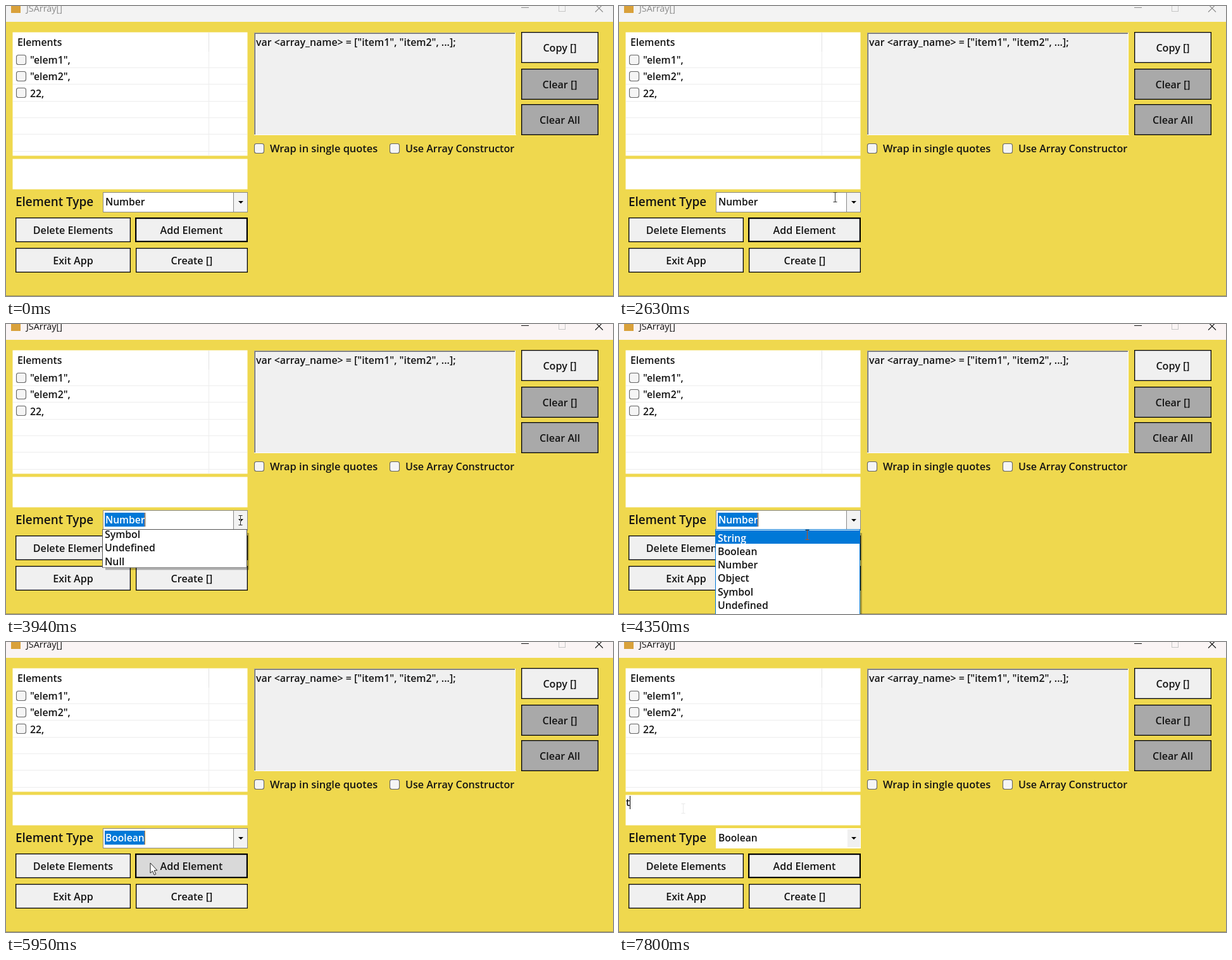
An HTML page with a canvas for the animation above (8000 ms loop, 959x458 px).

```html
<!DOCTYPE html>
<html lang="en">
<head>
<meta charset="utf-8">
<title>JSArray[]</title>
<style>
html, body { margin: 0; width: 100%; height: 100%; overflow: hidden; background: #efd84e; }
canvas { display: block; }
</style>
</head>
<body>
<canvas id="stage" width="959" height="458"></canvas>
<script>
const ctx = document.getElementById('stage').getContext('2d');
const LOOP = 8000;
const INK = '#141414', YELLOW = '#efd84e', FACE = '#f0f0f0', BLUE = '#0078d7';
const FAMILY = '"Open Sans", "Noto Sans", sans-serif';
const TYPES = ['String', 'Boolean', 'Number', 'Object', 'Symbol', 'Undefined', 'Null'];
const ROW = 21.3, LIST_H = TYPES.length * ROW + 2, LIST_W = 229;

// Event times in ms
const FOCUS = 3740, OPENED = 4010, PRESS = 5880, PICK = 5950, LEAVE = 6680, EDIT = 7280, TYPE = 7800;

// Pointer moves: start, end, steps, from, to, eased
const MOVES = [
  [740, 1070, 6, 840, 452, 681, 410],
  [1140, 1490, 6, 655, 400, 513, 345],
  [1560, 1620, 2, 500, 341, 491, 338],
  [2220, 2630, 7, 476, 334, 341, 302, true],
  [2760, 2960, 4, 342, 302, 344, 303],
  [3130, 3470, 6, 350, 304, 370, 310],
  [4200, 4350, 3, 346, 318, 297, 333],
  [4420, 4610, 4, 284, 335, 262, 338],
  [5080, 5420, 6, 258, 340, 238, 353],
  [5620, 5680, 2, 233, 351, 228, 349],
  [6680, 7010, 5, 205, 333, 101, 263, true]
];

function rect(x, y, w, h, color) {
  ctx.fillStyle = color;
  ctx.fillRect(x, y, w, h);
}

function frame(x, y, w, h, color, line = 1) {
  ctx.strokeStyle = color;
  ctx.lineWidth = line;
  ctx.strokeRect(x + line / 2, y + line / 2, w - line, h - line);
}

function text(str, x, y, size = 15.8, color = INK, align = 'left', weight = 600) {
  ctx.font = `${weight} ${size}px ${FAMILY}`;
  ctx.textAlign = align;
  ctx.fillStyle = color;
  ctx.fillText(str, x, y);
}

function poly(points, fill, stroke) {
  ctx.beginPath();
  points.forEach(([x, y]) => ctx.lineTo(x, y));
  ctx.closePath();
  ctx.fillStyle = fill;
  ctx.fill();
  if (stroke) {
    ctx.strokeStyle = stroke;
    ctx.lineWidth = 1;
    ctx.stroke();
  }
}

function lines(color, width, ...segments) {
  ctx.strokeStyle = color;
  ctx.lineWidth = width;
  ctx.beginPath();
  for (const [x1, y1, x2, y2] of segments) {
    ctx.moveTo(x1, y1);
    ctx.lineTo(x2, y2);
  }
  ctx.stroke();
}

function button(label, x, y, w, h, fill = FACE, line = 1.3) {
  rect(x, y, w, h, fill);
  frame(x, y, w, h, '#000', line);
  text(label, x + w / 2, y + h / 2 + 6.3, 16.1, INK, 'center');
}

function checkbox(x, y) {
  ctx.beginPath();
  ctx.roundRect(x + 0.5, y + 0.5, 15, 15, 3);
  ctx.fillStyle = '#f5f5f5';
  ctx.fill();
  ctx.strokeStyle = '#666';
  ctx.lineWidth = 1.1;
  ctx.stroke();
}

function pointer(t) {
  const move = MOVES.filter(m => t >= m[0]).pop();
  if (!move) return null;
  const [t0, t1, n, x0, y0, x1, y1, eased] = move;
  const step = Math.min(n - 1, Math.floor((t - t0) / (t1 - t0) * (n - 1) + 0.02));
  const u = step / (n - 1);
  const k = eased ? 1 - (1 - u) ** 1.5 : u;
  return { x: x0 + (x1 - x0) * k, y: y0 + (y1 - y0) * k };
}

function titleBar(active) {
  rect(0, 0, 959, 25, active ? '#faf4f4' : '#f3f3f3');
  rect(8, -4, 15, 15, '#d9a13a');
  const ink = active ? '#111' : '#8c8c8c';
  text('JSArray[]', 32, 8.5, 14.4, ink, 'left', 400);
  lines(ink, 1.1, [814, 2.5, 826, 2.5], [931, -2.5, 943, 9.5], [943, -2.5, 931, 9.5]);
  frame(873, -2, 11, 11, '#c6c6c6');
}

function elementList() {
  rect(10.5, 41.5, 371, 195, '#fff');
  for (let i = 0; i < 6; i++) rect(11, 97 + Math.round(i * 26.3), 370, 1, '#ededed');
  rect(320, 42, 1, 194, '#ededed');
  rect(320, 42, 1, 30, '#e0e0e0');
  text('Elements', 18, 63);
  ['"elem1",', '"elem2",', '22,'].forEach((item, i) => {
    checkbox(16, 77 + 26 * i);
    text(item, 38, 91 + Math.round(26.4 * i));
  });
}

function output() {
  rect(392, 42, 413, 162, FACE);
  rect(392, 42, 413, 1, '#a0a0a0');
  rect(392, 42, 1, 162, '#a0a0a0');
  rect(393, 43, 411, 1, '#696969');
  rect(393, 43, 1, 160, '#696969');
  rect(392, 203, 414, 1, '#fff');
  rect(804, 42, 1, 162, '#fff');
  text('var <array_name> = ["item1", "item2", ...];', 395, 63, 15.9);
}

function combo(t) {
  const value = t < PICK ? 'Number' : 'Boolean';
  const focused = t >= FOCUS && t < EDIT;
  rect(153, 294, 229, 32, '#fff');
  if (t < EDIT) {
    rect(360, 295, 21, 30, '#f3f3f3');
    frame(153, 294, 229, 32, '#8a8a8a');
    rect(359, 295, 1, 30, '#8a8a8a');
  } else {
    rect(361, 296, 20, 28, FACE);
  }
  poly([[367, 308], [375, 308], [371, 312]], '#000');
  ctx.font = `600 15.6px ${FAMILY}`;
  const end = 157 + ctx.measureText(value).width;
  if (focused) rect(156, 298, end - 155, 22, BLUE);
  text(value, 157, 315, 15.6, focused ? '#fff' : INK);
  const blink = Math.floor((t - PICK) / 530) % 2 === 0;
  if (focused && blink) rect(Math.round(end), 298, 1, 22, '#ff8728');
}

function dropDown(t, hover) {
  const step = Math.min(4, Math.floor((t - FOCUS) / (OPENED - FOCUS) * 4 + 0.02));
  if (step < 1) return;
  const shown = 15 + (LIST_H - 15) * (step - 1) / 3;
  rect(157, 330, 227, shown - 2, 'rgba(0,0,0,.28)');
  ctx.save();
  ctx.beginPath();
  ctx.rect(152, 324, LIST_W, shown + 1);
  ctx.clip();
  rect(152, 324, LIST_W, shown + 1, '#fff');
  const top = 326 - (LIST_H - shown);
  TYPES.forEach((name, i) => {
    const y = top + i * ROW, on = i === hover;
    if (on) rect(153, Math.round(y), LIST_W - 2, 21, BLUE);
    text(name, 156, y + 17.5, 15.8, on ? '#fff' : INK);
  });
  frame(152, 324, LIST_W, shown + 1, step < 4 ? '#555' : BLUE);
  ctx.restore();
}

function arrow(x, y) {
  const shape = [[0, 0], [0, 16], [3.6, 12.8], [6.2, 18.8], [8.8, 17.6], [6.2, 11.8], [10.8, 11.6]];
  poly(shape.map(([dx, dy]) => [x + dx, y + dy]), '#fff', '#222');
}

function iBeam(x, y, faint) {
  x = Math.round(x) + 0.5;
  y = Math.round(y);
  ctx.globalCompositeOperation = 'difference';
  lines(faint ? '#161616' : '#c8c8c8', 1,
    [x, y - 7, x, y + 7],
    [x - 3, y - 7.5, x + 3, y - 7.5],
    [x - 3, y + 7.5, x + 3, y + 7.5]);
  ctx.globalCompositeOperation = 'source-over';
}

function clickRing(x, y) {
  ctx.globalCompositeOperation = 'multiply';
  ctx.beginPath();
  ctx.arc(x - 1.5, y - 1, 15, 0, Math.PI * 2);
  ctx.fillStyle = '#ffff78';
  ctx.fill();
  ctx.globalCompositeOperation = 'source-over';
}

function draw(t) {
  const p = pointer(t);
  const open = t >= FOCUS && t < PICK;
  rect(0, 0, 959, 458, YELLOW);
  rect(0, 457, 959, 1, '#a99b48');
  titleBar(t >= FOCUS);
  elementList();
  output();

  button('Copy []', 814, 41, 122, 49);
  button('Clear []', 814, 99, 122, 49, '#a9a9a9');
  button('Clear All', 814, 155, 122, 49, '#a9a9a9');
  checkbox(392, 217);
  text('Wrap in single quotes', 417, 231, 16.4);
  checkbox(606, 217);
  text('Use Array Constructor', 631, 231, 16.1);

  rect(10.5, 241.5, 371, 48, '#fff');
  if (t >= TYPE) text('t', 11, 259);
  if (t >= EDIT) rect(t < TYPE ? 12 : 17, 243, 1, 21, '#000');

  text('Element Type', 15, 315.5, 18.9);
  combo(t);
  button('Delete Elements', 15, 334, 182, 39);
  button('Add Element', 204, 334, 178, 39, t >= PICK && t < LEAVE ? '#d9d9d9' : FACE, 2.2);
  button('Exit App', 15, 382, 182, 39);
  button('Create []', 205, 382, 177, 39);

  if (open) dropDown(t, p.y > 348 ? 1 : p.y > 326 ? 0 : 2);
  if (!p) return;

  const inCombo = p.x > 153 && p.x < 382 && p.y > 294 && p.y < 325;
  const inBox = p.x < 382 && p.y > 241 && p.y < 290;
  if (open || inCombo || inBox) iBeam(p.x, p.y, t >= TYPE);
  else arrow(p.x, p.y);

  const pressed = [[FOCUS, 3940], [PRESS, PICK], [EDIT, 7480]].some(([a, b]) => t >= a && t < b);
  if (pressed) clickRing(p.x, p.y);
}

const start = performance.now();
function tick() {
  draw((performance.now() - start) % LOOP);
  requestAnimationFrame(tick);
}
tick();
</script>
</body>
</html>
```
